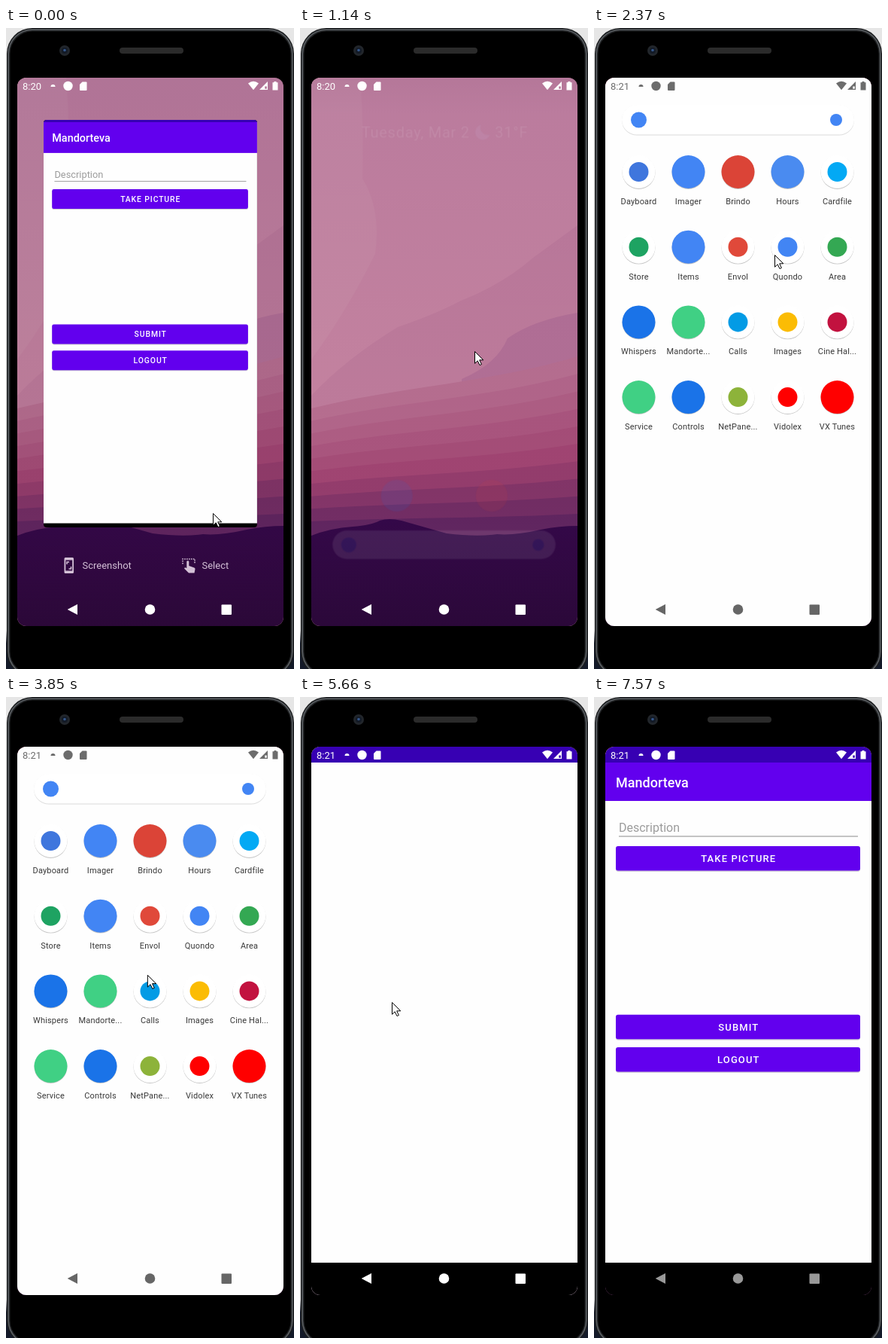
An HTML page that plays this animation: 383 by 851 pixels, repeating every 8380 ms.

```html
<!DOCTYPE html>
<html lang="en">
<head>
<meta charset="utf-8">
<title>App launcher</title>
<style>
html, body { margin: 0; width: 100%; height: 100%; overflow: hidden; background: #000; }
svg { display: block; width: 100%; height: 100%; font-family: Roboto, sans-serif; }
</style>
</head>
<body>
<svg id="stage" viewBox="0 0 383 851" xmlns="http://www.w3.org/2000/svg">
  <defs>
    <clipPath id="screenClip"><rect x="15" y="66" width="354" height="728" rx="12"/></clipPath>
    <clipPath id="cardClip"><rect x="50" y="122" width="284" height="541" rx="4"/></clipPath>
    <linearGradient id="outside" x2="0" y2="1">
      <stop offset=".94" stop-color="#e6e6e6"/><stop offset=".96" stop-color="#141a29"/>
    </linearGradient>
    <linearGradient id="hill" x2="0" y2="1">
      <stop offset="0" stop-color="#3a0a56"/><stop offset="1" stop-color="#2a093f"/>
    </linearGradient>
    <linearGradient id="shade" x2="0" y2="1">
      <stop offset="0" stop-opacity=".27"/><stop offset="1" stop-opacity="0"/>
    </linearGradient>
    <linearGradient id="dimmer" x2="0" y2="1">
      <stop offset="0" stop-color="#14002a"/>
      <stop offset=".75" stop-color="#14000f" stop-opacity=".8"/>
      <stop offset="1" stop-color="#300010" stop-opacity=".5"/>
    </linearGradient>
  </defs>
</svg>
<script>
const LOOP = 8380;
const stage = document.getElementById('stage');

function add(parent, tag, attrs = {}, text) {
  const node = document.createElementNS(stage.namespaceURI, tag);
  set(node, attrs);
  if (text) node.textContent = text;
  parent.appendChild(node);
  return node;
}
function set(node, attrs) {
  for (const k in attrs) node.setAttribute(k, attrs[k]);
}
const group = (p, attrs) => add(p, 'g', attrs);
const box = (p, x, y, width, height, fill, rx = 0) => add(p, 'rect', { x, y, width, height, fill, rx });
const disc = (p, cx, cy, r, fill) => add(p, 'circle', { cx, cy, r, fill });
const shape = (p, d, fill, more) => add(p, 'path', { d, fill, ...more });
const label = (p, x, y, size, fill, text, more) =>
  add(p, 'text', { x, y, 'font-size': size, fill, ...more }, text);
const show = (node, on) => set(node, { display: on ? 'inline' : 'none' });
const mix = (a, b, u) => a + (b - a) * u;
const ramp = (t, a, b) => Math.min(1, Math.max(0, (t - a) / (b - a)));
const smooth = u => u * u * (3 - 2 * u);

// Device body: nested rounded shells
['#1b1d1f', '#5d6165', '#232527', '#000'].forEach((fill, i) => {
  if (!i) box(stage, 0, 0, 383, 851, 'url(#outside)');
  const inset = 1.5 * i;
  box(stage, 1 + inset, inset, 382 - 2 * inset, 862 - 2 * inset, fill, 34 - inset);
});
disc(stage, 78, 30, 7, '#22262b');
disc(stage, 78, 30, 4, '#131a26');
disc(stage, 78, 29.5, 1.8, '#34568a');
box(stage, 151, 26, 85, 8, '#2b2b2b', 4);

const screen = group(stage, { 'clip-path': 'url(#screenClip)' });

// Wallpaper
box(screen, 15, 66, 354, 728, '#f3a5c5');
shape(screen, 'M15 66H80Q85 130 83 200 108 240 100 300 60 380 15 440Z', '#f6acc9');
shape(screen, 'M15 488Q60 440 130 397 180 380 214 362 270 340 310 305L369 262V700H15Z', '#eb9cbf');
shape(screen, 'M215 466Q262 446 276 412 310 388 369 378V470H215Z', '#dc8db8');
const skyTones = [[225, 139, 176], [194, 82, 136], [112, 46, 114]];
const BANDS = 10;
for (let i = 0; i < BANDS; i++) {
  const u = i / (BANDS - 1), k = u < .6 ? 0 : 1;
  const tone = skyTones[k].map((c, j) => Math.round(mix(c, skyTones[k + 1][j], k ? (u - .6) / .4 : u / .6)));
  const l = mix(505, 655, u), r = mix(436, 645, u), sag = mix(8, 2, u);
  shape(screen, `M15 ${l}C130 ${mix(l, r, .3) - sag} 250 ${mix(l, r, .6) + sag} 369 ${r}V700H15Z`, `rgb(${tone})`);
}
shape(screen, 'M15 674Q40 664 70 662 95 660 106 654 118 650 135 654 170 664 195 671 235 676 262 672 285 674 320 666 345 661 369 661V794H15Z', 'url(#hill)');
const scrim = box(screen, 15, 66, 354, 48, 'url(#shade)');
const dim = box(screen, 15, 66, 354, 728, 'url(#dimmer)');

// Form screen, drawn full size
function form(parent) {
  const g = group(parent);
  box(g, 15, 66, 354, 728, '#000');
  box(g, 15, 87, 354, 664, '#fefefe');
  box(g, 15, 66, 354, 21, '#3700b3');
  const body = group(g);
  box(body, 15, 87, 354, 51, '#6200ee');
  label(body, 29, 120, 18, '#fff', 'Mandorteva', { 'font-weight': 500 });
  label(body, 33, 179, 16, '#9c9c9c', 'Description');
  box(body, 33, 184.5, 318, 1, '#8c8c8c');
  for (const [y, text] of [[198, 'TAKE PICTURE'], [421.7, 'SUBMIT'], [465, 'LOGOUT']]) {
    box(body, 29, y + 1.2, 325, 32.5, '#c9c4d2', 3);
    box(body, 29, y, 325, 32.5, '#6200ee', 3);
    label(body, 192.3, y + 21.2, 13, '#fff', text,
      { 'font-weight': 500, 'letter-spacing': 1.1, 'text-anchor': 'middle' });
  }
  return { g, body };
}

// Overview: card and its actions
const recents = group(screen);
const card = group(recents);
form(group(group(card, { 'clip-path': 'url(#cardClip)' }),
  { transform: 'translate(50 125) scale(.802) translate(-15 -87)' }));
const actions = group(recents);
const tint = '#d3c0d6';
shape(actions, 'M79 703h9.5q1.5 0 1.5 1.5v18q0 1.5-1.5 1.5h-9.5q-1.5 0-1.5-1.5v-18q0-1.5 1.5-1.5zM79.3 706.5v14h8.9v-14z', tint, { 'fill-rule': 'evenodd' });
shape(actions, 'M81 712v-3h3M86.5 715v3h-3', 'none', { stroke: tint, 'stroke-width': 1.5 });
label(actions, 101.5, 718, 13, tint, 'Screenshot');
shape(actions, 'M235 711.5v-6.5h16v6.5', 'none', { stroke: tint, 'stroke-width': 1.6, 'stroke-dasharray': '1.6 1.3' });
shape(actions, 'M240.3 708q1.5-1.5 3 0v6l7 2.5q1.5.7 1.2 2l-1 5h-7.5l-6-6 1-1.2 2.3.7z', tint);
label(actions, 260.5, 718, 13, tint, 'Select');

// Home and launcher panel
const home = group(screen);
const widgets = group(home);
const dateStyle = { 'letter-spacing': .7, stroke: '#8a6a80', 'stroke-opacity': .35, 'paint-order': 'stroke' };
label(widgets, 77, 140, 21, '#fbf3f9', 'Tuesday, Mar 2', dateStyle);
label(widgets, 262, 140, 21, '#fbf3f9', '31°F', dateStyle);
shape(widgets, 'M243 122A10.5 10.5 0 1 0 255 136Q245 137 242 129 241 125 243 122Z', '#cdc5e6');
const dock = group(widgets);
disc(dock, 126, 635, 22, '#1a73e8');
disc(dock, 257.5, 635, 22, '#db4437');

const panel = box(home, 15, 0, 354, 860, '#fefefe');
const list = group(home);
const search = group(list);
const searchRim = box(search, 37, -19.5, 309, 40, '#dcdcdc', 20);
const searchBox = box(search, 37, -20, 309, 39.5, '#fff', 20);
disc(search, 59.5, 0, 10.5, '#4285f4');
disc(search, 322, 0, 8, '#4285f4');

// [name, colour, 1 when the mark sits on a white disc]
const apps = [
  ['Dayboard', '#3f76dd', 1], ['Imager', '#4285f4'], ['Brindo', '#db4437'], ['Hours', '#4a8bf0'], ['Cardfile', '#03a9f4', 1],
  ['Store', '#1ea362', 1], ['Items', '#4285f4'], ['Envol', '#e0493a', 1], ['Quondo', '#4285f4', 1], ['Area', '#34a853', 1],
  ['Whispers', '#1a73e8'], ['Mandorte...', '#40d084'], ['Calls', '#039be5', 1], ['Images', '#fbbc04', 1], ['Cine Hal...', '#c2123f', 1],
  ['Service', '#40d084'], ['Controls', '#1a73e8'], ['NetPane...', '#8db33a', 1], ['Vidolex', '#f00', 1], ['VX Tunes', '#f00']
];
const grid = group(list);
apps.forEach(([name, fill, inset], i) => {
  const x = 59.5 + 66 * (i % 5), y = 69 + 99.7 * Math.floor(i / 5);
  disc(grid, x, y + .9, 22, '#c4c4c4');
  disc(grid, x, y, 22, inset ? '#fff' : fill);
  if (inset) disc(grid, x, y, 13, fill);
  label(grid, x, y + 43, 11, '#383838', name, { 'text-anchor': 'middle', 'letter-spacing': .15 });
});

// Launched app, status bar, navigation, pointer
const launched = form(screen);

const status = group(screen);
const timeText = add(status, 'text', { x: 22, y: 81.5, 'font-size': 13 }, '8:20');
const glyph = (d, more) => add(status, 'path', { d, ...more });
glyph('M59.5 78a3 3 0 0 1 6 0z');
add(status, 'circle', { cx: 82.5, cy: 77, r: 6.2 });
glyph('M101.5 71.5h5q1 0 1 1v9.5q0 1-1 1h-7.5q-1 0-1-1v-7z');
glyph('M322 73.5q7-5.5 14 0l-7 8.8z');
glyph('M348 71v11h-11zM346.8 74v3.5h-2.5v3.3h2.5z', { 'fill-rule': 'evenodd' });
glyph('M356.5 71h3v1.2h2v10.3h-7v-10.3h2z');

const nav = group(screen);
add(nav, 'path', { d: 'M81.7 772L95 765V779Z' });
add(nav, 'circle', { cx: 191.5, cy: 772, r: 6.8 });
add(nav, 'rect', { x: 286.5, y: 765.5, width: 13.5, height: 13.5, rx: 1 });

const pointer = shape(stage, 'M.5.5V16.3L4.2 12.8 7 18.6 9.4 17.5 6.7 11.8H11.8Z', '#fff',
  { stroke: '#000', 'stroke-width': 1 });

// The picture refreshes at each cue and in even steps of about 130 ms between cues
const cues = [0, 120, 1140, 1260, 1830, 1980, 2220, 2370, 3420, 3710, 4840, 5120, 5240, 5360, 5810, 6250, 6520, 6670, 7570, LOOP];
function snap(now) {
  const i = cues.findIndex(c => c > now), a = cues[i - 1], b = cues[i];
  const step = (b - a) / Math.max(1, Math.round((b - a) / 130));
  return a + Math.floor((now - a) / step) * step;
}

// Pointer stops: [time, x, y]
const stops = [
  [120, 275, 644], [1140, 232, 429], [1500, 226, 640], [1830, 218, 162], [2370, 240, 301],
  [3270, 154, 352], [3420, 174, 337], [3710, 174, 337], [4200, 228, 461], [4690, 123, 412],
  [4840, 122, 405], [6120, 122, 405], [6520, 127, 414], [7210, 307, 694], [7450, 332, 816]
];
function pointerAt(t) {
  const i = stops.findIndex(s => s[0] > t);
  if (i < 1) return stops.at(i).slice(1);
  const [t0, x0, y0] = stops[i - 1], [t1, x1, y1] = stops[i];
  const u = ramp(t, t0, t1);
  return [mix(x0, x1, u), mix(y0, y1, u)];
}

function draw(now) {
  const t = snap(now);

  show(recents, t < 1140);
  set(card, { transform: `translate(0 ${-620 * ramp(t, 390, 900) ** 2})` });
  set(actions, { opacity: 1 - ramp(t, 630, 1000) });

  const fade = ramp(t, 1105, 1430);
  const zoom = mix(.96, 1, ramp(t, 1140, 1430));
  const open = smooth(ramp(t, 1754, 2190));
  set(dim, { opacity: mix(.3, 0, ramp(t, 1090, 1430)) });
  set(scrim, { opacity: fade });
  set(home, { opacity: fade, transform: `translate(191.5 283) scale(${zoom}) translate(-191.5 -283)` });
  set(widgets, { opacity: Math.max(0, 1 - open * 1.9) });
  set(dock, { opacity: Math.max(0, 1 - open * 5), transform: `translate(0 ${-100 * open})` });
  set(panel, { y: mix(665, 66, open), rx: mix(20, 0, open), opacity: Math.min(1, open * 1.75) });
  set(list, { transform: `translate(0 ${mix(703, 122, open)})` });
  set(grid, { opacity: Math.min(1, open * 13) });
  set(searchBox, { opacity: Math.min(1, .8 + open * .4) });
  set(searchRim, { opacity: open > .5 ? 1 : 0 });

  show(launched.g, t >= 5360);
  const grow = 1 - (1 - ramp(t, 5240, 5660)) ** 3;
  set(launched.g, {
    opacity: Math.min(1, grow * 1.4),
    transform: `translate(${mix(103.5, 15, grow)} ${mix(368, 66, grow)}) scale(${mix(44 / 354, 1, grow)} ${mix(44 / 728, 1, grow)}) translate(-15 -66)`
  });
  show(launched.body, t >= 6800);

  const onWhite = t >= 2370 && t < 5650;
  timeText.textContent = t < 1260 ? '8:20' : '8:21';
  set(status, { fill: onWhite ? '#6c6c6c' : '#fff' });
  const grey = onWhite ? 102 : Math.round(mix(255, 153, ramp(t, 6250, 6900)));
  set(nav, { fill: `rgb(${grey},${grey},${grey})` });

  show(pointer, t < 7570);
  set(pointer, { transform: `translate(${pointerAt(t)})` });
}

let start;
function frame(now) {
  start ??= now;
  draw((now - start) % LOOP);
  requestAnimationFrame(frame);
}
draw(0);
requestAnimationFrame(frame);
</script>
</body>
</html>
```
